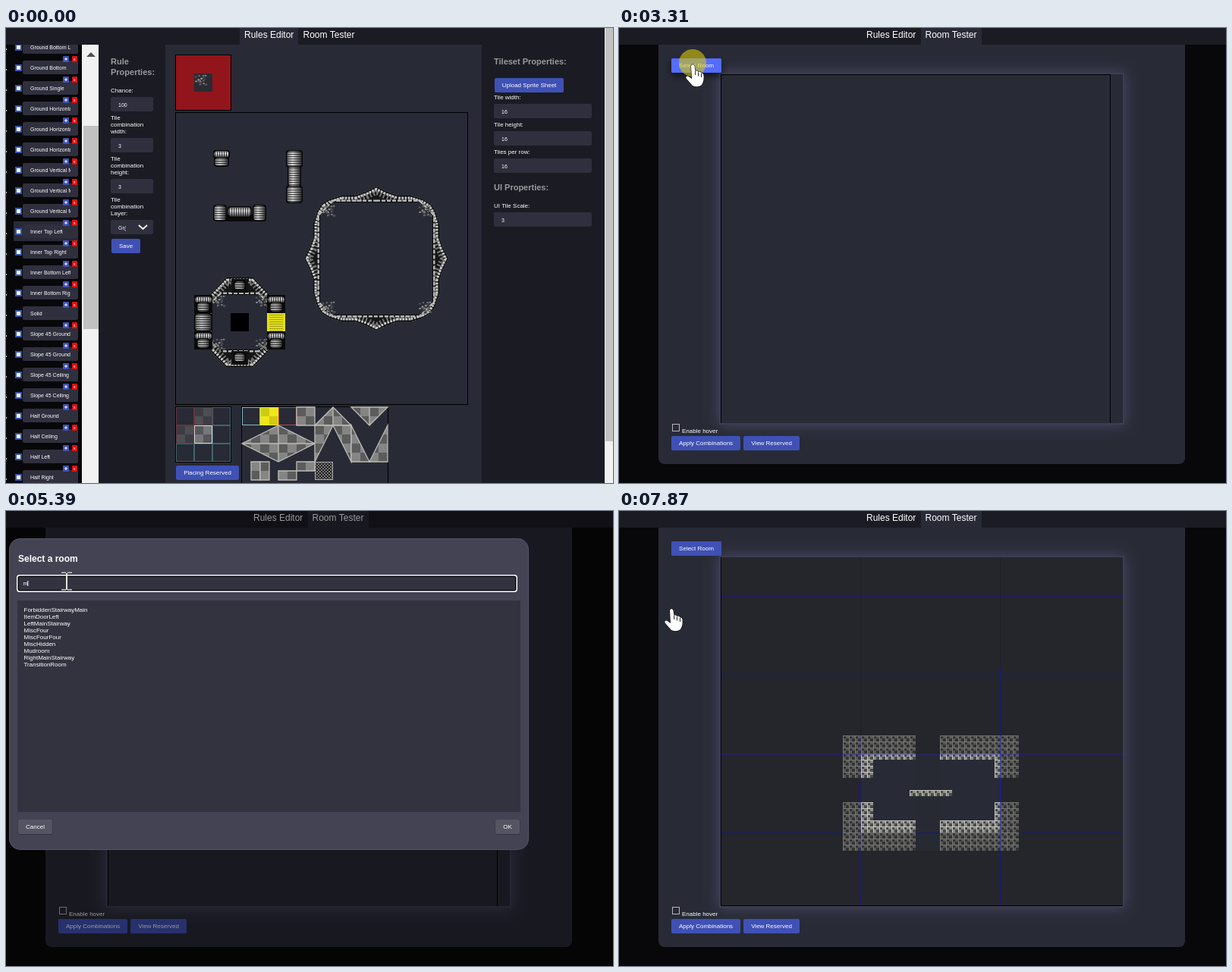
An HTML page with a canvas for the animation above (8000 ms loop, 800 by 600 pixels).

```html
<!DOCTYPE html>
<html lang="en">
<head>
<meta charset="utf-8">
<title>Room editor</title>
<style>
html, body { margin: 0; width: 100%; height: 100%; overflow: hidden; background: #08080a; }
canvas { display: block; }
</style>
</head>
<body>
<canvas id="stage" width="800" height="600"></canvas>
<script>
const ctx = document.getElementById('stage').getContext('2d');
const LOOP = 8000, SWITCH = 1710, OPEN = 3640, FOCUS = 4400, PICK = 7590, CLOSE = 7870;
const PANEL = '#282a36', BAR = '#1b1b24', FIELD = '#2f2f3e', BLUE = '#3f51b5';

const clamp = v => Math.max(0, Math.min(1, v));
const progress = (t, from, to) => clamp((t - from) / (to - from));
const ease = p => p * p * (3 - 2 * p);
const mix = (a, b, p) => a + (b - a) * p;
const noise = n => { const v = Math.sin(n * 127.1) * 43758.5; return v - Math.floor(v); };

// ---- drawing helpers ----
function rect(x, y, w, h, color) { ctx.fillStyle = color; ctx.fillRect(x, y, w, h); }
function frame(x, y, w, h, color, line = 1) {
  ctx.strokeStyle = color; ctx.lineWidth = line;
  ctx.strokeRect(x + line / 2, y + line / 2, w - line, h - line);
}
function round(x, y, w, h, r, color) {
  ctx.fillStyle = color; ctx.beginPath(); ctx.roundRect(x, y, w, h, r); ctx.fill();
}
function shape(points, color) {
  ctx.beginPath();
  points.forEach(p => ctx.lineTo(p[0], p[1]));
  ctx.closePath();
  if (color) { ctx.fillStyle = color; ctx.fill(); }
}
function clipped(draw, x, y, w, h) {
  ctx.save(); ctx.beginPath(); ctx.rect(x, y, w, h); ctx.clip(); draw(); ctx.restore();
}
// y is the middle of the line
function text(s, x, y, size = 8, color = '#fff', weight = 'normal') {
  ctx.font = `${weight} ${size}px "Liberation Sans", Arial, sans-serif`;
  ctx.fillStyle = color;
  ctx.fillText(s, x, Math.round(y + size * .36));
}
function button(label, x, y, w, color = BLUE) {
  round(x, y, w, 19, 2, color);
  ctx.textAlign = 'center'; text(label, x + w / 2, y + 9.5); ctx.textAlign = 'left';
}
function field(value, x, y, w) {
  round(x, y, w, 19, 2, FIELD);
  text(value, x + 10, y + 10, 7);
}
const heading = (s, x, y) => text(s, x, y, 11, '#9a9a9c', 'bold');

// ---- metal tiles ----
function pipe(x, y, w, h, vertical, tone = '#eee') {
  const g = vertical ? ctx.createLinearGradient(x, 0, x + w, 0) : ctx.createLinearGradient(0, y, 0, y + h);
  [[0, '#222'], [.15, '#999'], [.4, tone], [.65, '#999'], [1, '#222']].forEach(s => g.addColorStop(...s));
  round(x, y, w, h, 4, '#050505');
  round(x + 1.5, y + 1.5, w - 3, h - 3, 3, g);
  const n = vertical ? h : w;
  for (let i = 2; i < n - 1; i += 3)
    vertical ? rect(x + 2, y + i, w - 4, 1.3, '#000a') : rect(x + i, y + 2, 1.3, h - 4, '#000a');
}
function block(x, y) {
  rect(x, y, 24, 24, '#0b0b0b');
  pipe(x, y + 1, 24, 11, false, '#ddd');
  pipe(x + 3, y + 9, 18, 14, true, '#bbb');
}
function rubble(x, y, size = 15) {
  for (let i = 0; i < 26; i++) {
    const shade = 40 + Math.floor(noise(i + 7) * 120);
    rect(x + noise(i) * size, y + noise(i + 50) * size, 2.5, 2, `rgb(${shade},${shade},${shade})`);
  }
}
// expands an eighth of an outline, given from the top to the diagonal
function outline(cx, cy, eighth) {
  const quarter = [...eighth, ...[...eighth].reverse().map(([x, y]) => [-y, -x])];
  const path = new Path2D();
  for (let turn = 0, pts = quarter; turn < 4; turn++, pts = pts.map(([x, y]) => [-y, x]))
    pts.forEach(([x, y]) => path.lineTo(cx + x, cy + y));
  path.closePath();
  return path;
}
function ring(cx, cy, outerEighth, innerEighth) {
  const outer = outline(cx, cy, outerEighth), inner = outline(cx, cy, innerEighth);
  const both = new Path2D(outer);
  both.addPath(inner);
  const stroke = (path, width, color, dash = []) => {
    ctx.lineWidth = width; ctx.strokeStyle = color; ctx.setLineDash(dash); ctx.stroke(path);
  };
  ctx.save();
  ctx.clip(both, 'evenodd');
  ctx.fillStyle = '#161616'; ctx.fill(both, 'evenodd');
  stroke(outer, 20, '#777', [2, 2.5]);
  stroke(outer, 9, '#ccc', [2.5, 1.5]);
  stroke(inner, 7, '#b5b5b5', [5, 2]);
  stroke(outer, 3, '#0a0a0a');
  stroke(inner, 2, '#0a0a0a');
  ctx.restore();
}

// ---- tabs ----
function tabs(t) {
  const switched = t >= SWITCH, x = switched ? 320 : 308;
  rect(0, 0, 800, 22, BAR);
  ctx.globalAlpha = switched ? 1 - progress(t, SWITCH, 2130) : 1;
  rect(x, 0, 77, 22, PANEL);
  ctx.globalAlpha = 1;
  if (switched) rect(398, 0, 80, 22, PANEL);
  ctx.globalAlpha = progress(t, 820, 1170) * (1 - progress(t, 2400, 2700));
  rect(x + 78, 0, 80, 22, '#343443');
  ctx.globalAlpha = 1;
  text('Rules Editor', x + 6, 9, 12);
  text('Room Tester', x + 83.5, 9, 12);
}

// ---- rules page ----
const RULES = ['Ground Bottom Left', 'Ground Bottom', 'Ground Single', 'Ground Horizontal', 'Ground Horizontal',
  'Ground Horizontal', 'Ground Vertical Mid', 'Ground Vertical Mid', 'Ground Vertical Mid', 'Inner Top Left',
  'Inner Top Right', 'Inner Bottom Left', 'Inner Bottom Right', 'Solid', 'Slope 45 Ground L', 'Slope 45 Ground R',
  'Slope 45 Ceiling L', 'Slope 45 Ceiling R', 'Half Ground', 'Half Ceiling', 'Half Left', 'Half Right'];

function sidebar() {
  RULES.forEach((name, i) => {
    const y = 25 + i * 27;
    if (i === 9) rect(10, y - 13, 85, 26, PANEL);
    rect(0, y + 2, 1, 2, '#ccc');
    round(22, y - 9, 73, 18, 2, FIELD);
    rect(12, y - 4, 9, 9, '#3355b5');
    rect(14, y - 2, 5, 5, '#fff');
    clipped(() => text(name, 32, y, 7), 22, y - 9, 63, 18);
    round(75, y - 15, 8, 8, 1, BLUE);
    rect(77, y - 11.5, 4, 1, '#fff'); rect(78.5, y - 13, 1, 4, '#fff');
    round(87, y - 15, 7, 8, 1, '#e01010');
    text('x', 88.7, y - 11, 6);
  });
  rect(100, 22, 22, 578, '#f1f1f1');
  rect(102, 129, 20, 268, '#c1c1c1');
  shape([[106, 38], [112, 32], [118, 38]], '#505050');
}
function ruleForm() {
  heading('Rule', 138, 44); heading('Properties:', 138, 58);
  text('Chance:', 138, 82); field('100', 138, 91, 56);
  ['width:', 'height:', 'Layer:'].forEach((last, i) => {
    ['Tile', 'combination', last].forEach((s, j) => text(s, 138, 118 + i * 54 + j * 9));
    field(i < 2 ? '3' : 'Gr(', 138, 145 + i * 54, 56);
  });
  ctx.beginPath(); ctx.moveTo(175, 260); ctx.lineTo(180.5, 265); ctx.lineTo(186, 260);
  ctx.strokeStyle = '#fff'; ctx.lineWidth = 2; ctx.stroke();
  button('Save', 139, 278, 38);
}
function ruleBoard() {
  rect(223, 35, 74, 74, '#000'); rect(224, 36, 72, 72, '#92151b');
  rect(248, 60, 24, 24, '#2b2b33'); rubble(249, 61, 14);
  frame(223, 111, 386, 386, '#000');
  pipe(273, 161, 22, 11, false); pipe(274, 170, 20, 13, true, '#ccc');
  pipe(371, 180, 18, 30, true); pipe(369, 161, 22, 23, true); pipe(369, 208, 22, 23, true);
  rect(290, 246, 36, 9, '#0a0a0a'); pipe(292, 235, 32, 15, false);
  pipe(273, 233, 18, 22, true); pipe(325, 233, 18, 22, true);

  ring(488, 304, [[0, -95], [14, -88], [28, -83], [46, -83], [62, -78], [72, -72]], [[0, -74], [56, -74], [65, -65]]);
  for (const x of [417, 544]) for (const y of [233, 360]) rubble(x, y);

  ring(308, 388, [[0, -59], [18, -59], [38, -38]], [[0, -36], [24, -36], [30, -30]]);
  for (const x of [272, 329]) for (const y of [352, 409]) rubble(x, y);
  for (const y of [331, 426]) { rect(297, y, 22, 18, '#111'); pipe(300, y + 2, 16, 13, true, '#aaa'); }
  for (const x of [248, 344]) { block(x, 352); block(x, 400); }
  pipe(248, 376, 24, 24, true, '#ccc');
  rect(344, 376, 24, 24, '#e2de14');
  for (let i = 2; i < 24; i += 3) rect(347, 376 + i, 18, 1, '#a39f18');
  rect(296, 376, 24, 24, '#000');
}
function checker(x, y, w, h, light = '#858585', dark = '#5c5c5c') {
  for (let i = 0; i < w; i += 12) for (let j = 0; j < h; j += 12)
    rect(x + i, y + j, Math.min(12, w - i), Math.min(12, h - j), (i + j) / 12 % 2 ? light : dark);
}
function facet(points) {
  ctx.save();
  shape(points); ctx.clip();
  checker(311, 500, 192, 96);
  ctx.restore();
  shape(points); ctx.strokeStyle = '#bdbdb5'; ctx.lineWidth = 1.3; ctx.stroke();
}
function brushes() {
  rect(223, 499, 74, 74, '#000'); rect(224, 500, 72, 72, PANEL);
  checker(248, 500, 24, 24, '#4d4d54', '#3c3c44');
  checker(224, 524, 24, 24, '#4d4d54', '#3c3c44');
  for (let i = 0; i < 9; i++)
    frame(224 + i % 3 * 24, 500 + Math.floor(i / 3) * 24, 24, 24, i < 2 || i === 3 ? '#663540' : '#41646a');
  checker(248, 524, 24, 24, '#77777a', '#55555a'); frame(248, 524, 24, 24, '#d5d5d5');
  button('Placing Reserved', 224, 577, 83);

  frame(310, 499, 194, 110, '#000');
  frame(311, 500, 24, 24, '#83bdcc');
  checker(335, 500, 24, 24, '#eee81a', '#d0ca12'); frame(335, 500, 24, 24, '#eee81a');
  frame(359, 500, 24, 24, '#b44a50');
  facet([[383, 500], [407, 500], [407, 524], [383, 524]]);
  facet([[407, 524], [431, 500], [455, 524]]); facet([[431, 500], [431, 524]]);
  facet([[455, 500], [503, 500], [479, 524]]); facet([[479, 500], [479, 524]]);
  facet([[311, 548], [359, 524], [407, 548], [359, 572]]);
  facet([[311, 548], [407, 548]]); facet([[359, 524], [359, 572]]);
  facet([[407, 524], [431, 524], [407, 572]]); facet([[431, 524], [455, 524], [455, 572]]);
  facet([[455, 524], [479, 572], [455, 572]]); facet([[503, 524], [503, 572], [479, 572]]);
  for (const [x, y, w, h] of [[323, 572, 12, 24], [335, 572, 12, 24], [359, 584, 24, 12], [383, 572, 24, 12]])
    facet([[x, y], [x + w, y], [x + w, y + h], [x, y + h]]);
  rect(407, 572, 24, 24, '#1c1c1c');
  for (let i = 0; i < 144; i++) if ((i + Math.floor(i / 12)) % 2) rect(407 + i % 12 * 2, 572 + Math.floor(i / 12) * 2, 2, 2, '#777');
  frame(407, 572, 24, 24, '#aaa');
}
function tilesetForm() {
  heading('Tileset Properties:', 643, 44);
  button('Upload Sprite Sheet', 644, 66, 91);
  ['Tile width:', 'Tile height:', 'Tiles per row:'].forEach((s, i) => {
    text(s, 643, 91 + i * 36); field('16', 643, 100 + i * 36, 129);
  });
  heading('UI Properties:', 643, 210);
  text('UI Tile Scale:', 643, 234); field('3', 643, 243, 129);
  rect(789, 0, 11, 600, '#f1f1f1'); rect(790, 0, 10, 545, '#c1c1c1');
}
function rulesPage(t) {
  rect(122, 22, 667, 578, BAR);
  rect(210, 22, 417, 578, PANEL);
  sidebar(); ruleForm(); ruleBoard(); brushes();
  tabs(t);
  tilesetForm();
}

// ---- room page ----
function wall(x, y, w, h, bright) {
  const [base, quad, edge] = bright ? ['#4a4a4a', '#8c8c88', '#c6c6be'] : ['#333', '#585858', '#747472'];
  for (let i = x; i < x + w; i += 8) for (let j = y; j < y + h; j += 8) {
    rect(i, j, 8, 8, base);
    rect(i + 4, j, 4, 4, quad); rect(i, j + 4, 4, 4, quad);
    rect(i, j, 8, 1, edge); rect(i, j, 1, 8, edge);
  }
}
function room() {
  rect(134, 61, 530, 460, '#24262b');
  rect(319, 321, 183, 103, PANEL);
  rect(391, 321, 32, 127, '#282a33');
  rect(318, 61, 1, 300, '#1e2024'); rect(502, 61, 1, 145, '#1e2024');
  rect(318, 361, 1.5, 160, '#1b1b72'); rect(502, 206, 1.5, 315, '#1b1b72');
  for (const y of [112.5, 216, 424]) rect(134, y, 530, 1.5, '#1b1b72');
  wall(295, 296, 96, 32); wall(295, 328, 40, 24);
  wall(423, 296, 104, 32); wall(495, 328, 32, 24);
  wall(295, 384, 40, 24); wall(295, 408, 96, 40);
  wall(495, 384, 32, 24); wall(423, 408, 104, 40);
  wall(319, 320, 72, 8, true); wall(319, 328, 16, 24, true);
  wall(423, 320, 80, 8, true); wall(495, 328, 8, 24, true);
  wall(319, 384, 16, 24, true); wall(319, 408, 72, 16, true);
  wall(495, 384, 8, 24, true); wall(423, 408, 80, 16, true);
  wall(383, 368, 56, 8, true);
  rect(134, 320, 530, 1.5, '#2020a088');
  rect(318, 296, 1, 152, '#2020a055'); rect(502, 296, 1.5, 152, '#2020a0aa');
  rect(134, 61, 1, 460, '#000'); rect(134, 520, 530, 1, '#000');
}
function roomPage(t) {
  round(52, 10, 694, 565, 8, PANEL);
  ctx.save();
  ctx.shadowColor = '#4a4a66'; ctx.shadowBlur = 18;
  rect(132, 59, 534, 464, '#3c3c54');
  ctx.restore();
  rect(134, 61, 530, 460, PANEL);
  if (t >= CLOSE) room();
  else {
    rect(134, 61, 514, 1, '#000'); rect(134, 61, 1, 460, '#000'); rect(647, 61, 1, 460, '#000');
  }
  const hover = t < CLOSE ? progress(t, 3060, 3300) : 0;
  ctx.save();
  ctx.shadowColor = `rgba(0,0,0,${hover * .6})`; ctx.shadowBlur = 10; ctx.shadowOffsetY = 4;
  round(69, 40, 66, 19, 2, BLUE);
  ctx.restore();
  button('Select Room', 69, 40, 66, `rgb(${mix(63, 83, hover)},${mix(81, 109, hover)},${mix(181, 254, hover)})`);
  frame(70, 522, 10, 10, '#b5b5b8');
  text('Enable hover', 83, 531);
  button('Apply Combinations', 69, 538, 91);
  button('View Reserved', 164, 538, 74);
  tabs(t);
}

// ---- room dialog ----
const ROOMS = `AscentToBlade DanceHall DanceHallCastleFrontShaft DanceHallEntryShaft DanceStairs EntryHall
  ForbiddenHall ForbiddenHallLow ForbiddenStairway ForbiddenStairwayMain ForbiddenWeaponryHall Gardens
  GardensBossFoyer Gardens_clone_587e6105-7fa3-4f1a-b845-48828a43e6ac
  Gardens_clone_843362fb-b878-4d95-92d6-6206e6d0bce3 Gardens_clone_c50fa414-20c1-4704-bcec-5bed414d6431
  GrandGarden ItemDoorLeft LeftMainStairway LevelHall MiscFour MiscFourFour MiscHidden Mudroom
  RightMainStairway ShortLevelHall ShortSlopedHall StairwayToGrandhall test TransitionRoom`.split(/\s+/);
const KEYS = [[FOCUS + 60, ''], [5390, 'm'], [5520, 'mis'], [5720, 'misc']];

function dialog(t, pointer) {
  const focused = t >= FOCUS && t < PICK, d = focused ? 0 : -2;
  const [keyTime, query] = KEYS.filter(k => k[0] <= t).pop() || KEYS[0];
  rect(0, 0, 800, 600, 'rgba(0,0,0,.4)');
  round(4, 36, 685, 411 + d, 15, '#555466');
  round(5, 37, 683, 409 + d, 14, '#444354');
  text('Select a room', 16, 63, 12, '#fff', 'bold');

  if (focused) {
    const line = mix(3, 1.5, progress(t, 4480, 4720));
    round(14, 84, 660, 23, 4, '#fff');
    round(14 + line, 84 + line, 660 - 2 * line, 23 - 2 * line, 3, '#08080c');
    rect(17, 87, 654, 17, '#333340');
  } else round(15, 85, 658, 19, 2, '#333340');
  const x = focused ? 22.5 : 21.5, y = focused ? 95.5 : 94.5;
  text(query || 'Filter options', x, y, 7, query ? '#fff' : '#62626e');
  if (focused && (t - keyTime) % 1060 < 530) rect(x + (query ? ctx.measureText(query).width : 0), 92, 1, 7, '#fff');

  rect(15, 118 + d, 663, 279, '#333340');
  if (t > 6500 && pointer.y > 121) rect(23, 126 + d, 647, 9, '#0a7cff');
  clipped(() => ROOMS.filter(r => r.toLowerCase().includes(query))
    .forEach((r, i) => text(r, 23.5, 130 + d + i * 9)), 15, 118 + d, 638, 279);
  if (!query) {
    rect(653, 118 + d, 25, 279, '#f1f1f1');
    rect(655, 143 + d, 21, 217, '#c1c1c1');
    shape([[659, 134 + d], [665.5, 128 + d], [672, 134 + d]], '#a3a3a3');
    shape([[659, 381 + d], [665.5, 387 + d], [672, 381 + d]], '#444');
  }
  for (const [label, bx, w] of [['Cancel', 16, 45], ['OK', 645, 32]]) {
    round(bx - .5, 407 + d, w + 1, 20, 3, '#333340');
    button(label, bx, 407 + d, w, '#555462');
  }
}

// ---- pointer ----
const PATH = [[130, 745, 620], [890, 419, 10], [2350, 419, 10], [3100, 97, 46], [4180, 97, 46], [4400, 77, 91],
  [6120, 77, 91], [6300, 74, 94], [6420, 74, 94], [6790, 70, 132], [7250, 70, 132], [7320, 69, 127], [LOOP, 69, 127]];
const CLICKS = [[1570, SWITCH], [3240, OPEN], [FOCUS, 4720], [PICK, CLOSE]];
const ARROW_TIMES = [[0, 800], [2420, 3030], [4180, 4330], [6480, 6640]];
const during = (spans, t) => spans.some(([from, to]) => t >= from && t < to);

function pointerAt(t) {
  const i = Math.max(1, PATH.findIndex(p => p[0] > t));
  const [t0, x0, y0] = PATH[i - 1], [t1, x1, y1] = PATH[i];
  const p = ease(progress(t, t0, t1));
  return { x: mix(x0, x1, p), y: mix(y0, y1, p) };
}
const HAND = new Path2D('M7 3Q9 -1 11.5 3L12.5 10Q15 8 16.5 11Q19 9.5 20.5 12.5Q23 12 23.5 15Q24.5 22 21 28Q16 32 9 29L1 20Q-1 16 3 16.5L8 20Z');
const ARROW = new Path2D('M0 0V20L5 16L8.5 24L12 22.5L8.5 15H14.5Z');

function drawPointer(t, { x, y }) {
  if (during(CLICKS, t)) {
    ctx.fillStyle = 'rgba(215,200,10,.6)';
    ctx.beginPath(); ctx.arc(x, y, 18, 0, 7); ctx.fill();
  }
  const arrow = during(ARROW_TIMES, t);
  if (t > 4300 && t < 6700 && y > 80 && y < 109 && !arrow) {
    rect(x + 2, y - 9, 2, 22, '#e4e4d8');
    rect(x - 4, y + 12, 6, 1.5, '#c8c8bc'); rect(x + 4, y + 12, 6, 1.5, '#c8c8bc');
    rect(x - 4, y - 10.5, 6, 1.5, '#c8c8bc'); rect(x + 4, y - 10.5, 6, 1.5, '#c8c8bc');
    return;
  }
  ctx.save();
  ctx.translate(arrow ? x : x - 9, arrow ? y : y + 1);
  ctx.strokeStyle = '#111'; ctx.lineWidth = 1.2; ctx.fillStyle = '#fff';
  const path = arrow ? ARROW : HAND;
  ctx.stroke(path); ctx.fill(path);
  if (!arrow) for (const [kx, ky] of [[12.2, 10], [16, 11.5], [20, 13]]) rect(kx, ky, 1, 5, '#222');
  ctx.restore();
}

function draw(now) {
  const t = now % LOOP, pointer = pointerAt(t);
  rect(0, 0, 800, 600, '#08080a');
  t < SWITCH ? rulesPage(t) : roomPage(t);
  if (t >= OPEN && t < CLOSE) dialog(t, pointer);
  drawPointer(t, pointer);
  requestAnimationFrame(draw);
}
requestAnimationFrame(draw);
</script>
</body>
</html>
```
